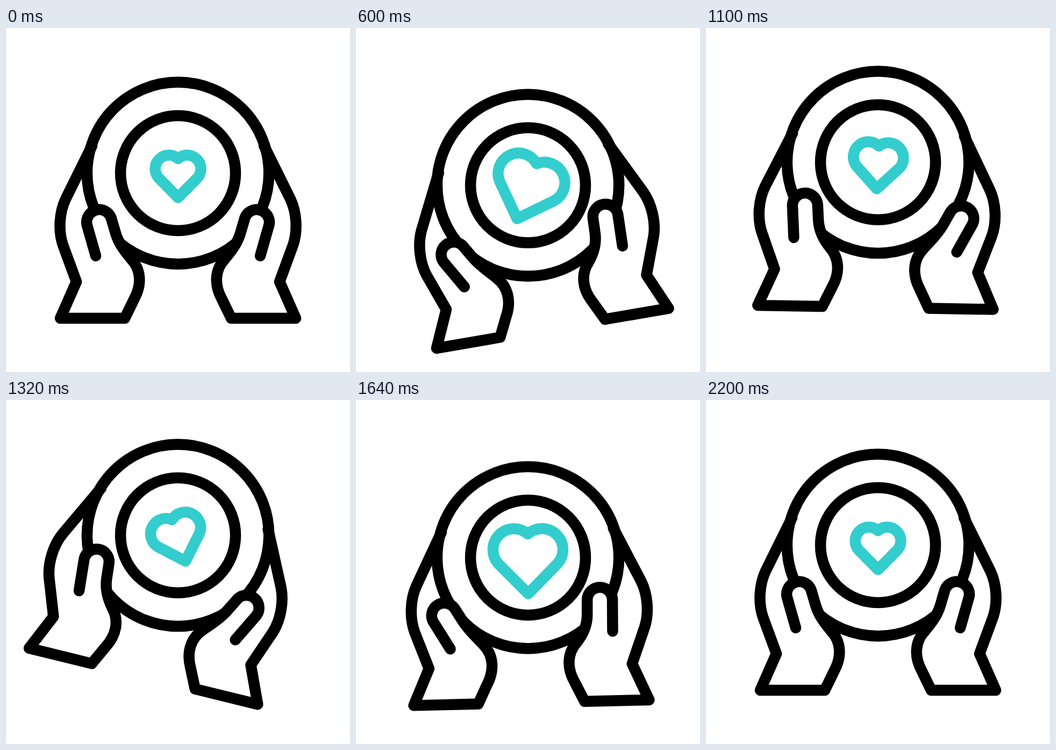
Animation, 640 px wide and 640 px high, one loop 2400 ms. Source, as an HTML page:

```html
<!DOCTYPE html>
<html lang="en">
<head>
<meta charset="utf-8">
<title>Hands holding a plate</title>
<style>
  html, body { margin: 0; width: 100%; height: 100%; overflow: hidden; background: #fff; }
  svg { display: block; width: 100vw; height: 100vh; }
</style>
</head>
<body>
<svg viewBox="0 0 640 640" fill="none" stroke="#000" stroke-width="20.5" stroke-linecap="round" stroke-linejoin="round">
  <defs>
    <path id="arm" d="M160 219L111 318C99 343 97 378 106 404L131 472 101 540H221L239 503C253 477 251 450 234 431"/>
  </defs>
  <g id="scene">
    <circle cx="320" cy="270" r="169.2"/>
    <circle cx="320" cy="270" r="107"/>
    <path id="heart" stroke="#33cdcd" d="M0-32A25.5 25.5 0 0 0-36 4L0 40.5 36 4A25.5 25.5 0 0 0 0-32Z"/>
    <g id="hands">
      <path id="left" fill="#fff"/>
      <use href="#arm"/>
      <g transform="translate(640) scale(-1 1)">
        <path id="right" fill="#fff"/>
        <use href="#arm"/>
      </g>
    </g>
  </g>
</svg>
<script>
const LOOP = 2400, STEP = 20;
const bobTimes = [200, 700, 1200, 1700, 2200];
const tiltTimes = [200, 800, 1400, 1800, 2200];
const $ = id => document.getElementById(id);
const place = (id, transform) => $(id).setAttribute('transform', transform);

// Value at time t, with sine easing between keys
function track(t, times, values) {
  const i = times.findIndex(k => t < k);
  if (i < 1) return values[0]; // every track starts and ends at rest
  const p = (t - times[i - 1]) / (times[i] - times[i - 1]);
  return values[i - 1] + (values[i] - values[i - 1]) * (1 - Math.cos(Math.PI * p)) / 2;
}

// The thumb turns about its root while the palm end stays fixed
function thumb(degrees) {
  const a = degrees * Math.PI / 180, c = Math.cos(a), s = Math.sin(a);
  const turn = (x, y) => {
    x -= 217;
    y -= 413;
    return `${217 + x * c - y * s} ${413 + x * s + y * c} `;
  };
  return `M${turn(167, 424)}L${turn(150.5, 366)}A23.5 23.5 0 0 1 ${turn(195.5, 353)}` +
    `L${turn(204, 382)}C${turn(210, 402)}222 417 234 431`;
}

function draw(t) {
  const bob = track(t, bobTimes, [0, 25, -25, 25, 0]);
  const size = track(t, bobTimes, [1, 1.55, 1.05, 1.55, 1]);
  const bend = track(t, bobTimes, [0, -16, 15.5, -16, 0]);
  const tilt = track(t, tiltTimes, [0, -13, 15, -10, 0]);
  const spin = track(t, tiltTimes, [0, 26, -20, 10, 0]);

  place('scene', `translate(0 ${bob})`);
  place('hands', `rotate(${tilt} 320 270)`);
  place('heart', `translate(320 275) rotate(${spin}) scale(${size})`);
  $('heart').setAttribute('stroke-width', 20.5 / size);
  $('left').setAttribute('d', thumb(bend));
  $('right').setAttribute('d', thumb(-bend));
}

const start = performance.now();
function tick() {
  const t = (performance.now() - start) % LOOP;
  draw(Math.floor(t / STEP) * STEP);
  requestAnimationFrame(tick);
}
tick();
</script>
</body>
</html>
```
